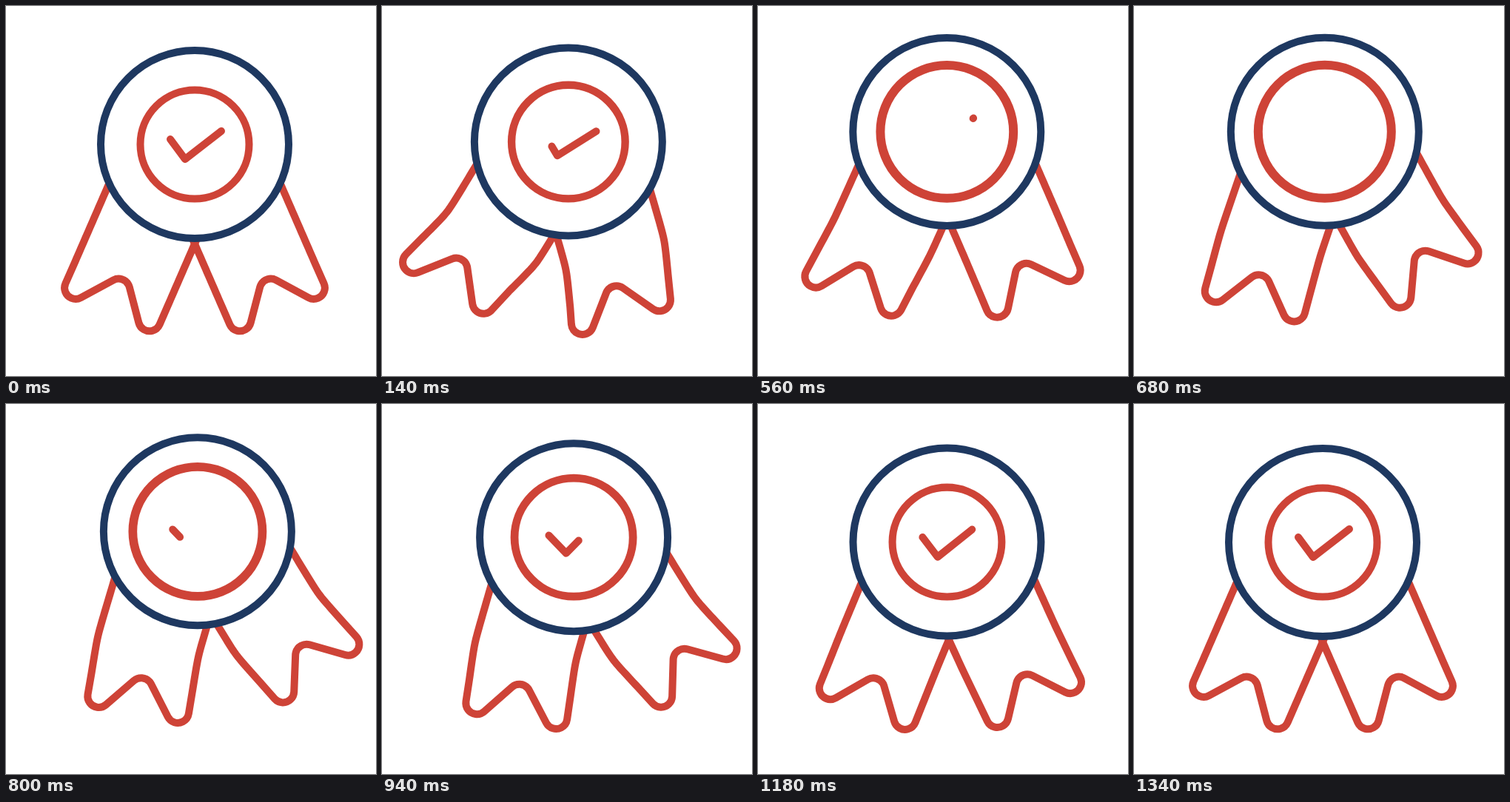
Write an HTML page with a canvas that moves like this. It is 500x500 px and loops after 1500 ms.

```html
<!DOCTYPE html>
<html lang="en">
<head>
<meta charset="utf-8">
<title>Award ribbon</title>
<style>
  html, body { margin: 0; width: 100%; height: 100%; overflow: hidden; background: #fff; }
  canvas { display: block; width: 500px; height: 500px; }
</style>
</head>
<body>
<canvas id="stage" width="500" height="500"></canvas>
<script>
const ctx = document.getElementById('stage').getContext('2d');
const RED = '#ce4337', NAVY = '#1e3860', LOOP = 1500, STEP = 20;
const rad = deg => deg * Math.PI / 180;

// Extreme poses; each ribbon gives its outward sway at top, middle and tip
const SWUNG_LEFT = { tilt: 8.6, left: [9, 10.5, 37.8], right: [2.5, 1.5, -19] };
const SWUNG_RIGHT = { tilt: -13, left: [14, 21, 17.5], right: [3, -3, 6] };

// cubic-bezier(1/3, 0, 1/3, 1)
function ease(x) {
  if (x <= 0) return 0;
  if (x >= 1) return 1;
  let lo = 0, hi = 1;
  for (let i = 0; i < 30; i++) {
    const m = (lo + hi) / 2;
    if (m - m * m + m * m * m < x) lo = m; else hi = m;
  }
  return 3 * lo * lo - 2 * lo * lo * lo;
}
const span = (t, from, to) => ease((t - from) / (to - from));

function pen(color, width) {
  ctx.strokeStyle = color;
  ctx.lineWidth = width;
  ctx.lineCap = ctx.lineJoin = 'round';
}

function ring(r, color, width) {
  ctx.beginPath();
  ctx.arc(0, 0, r, 0, 2 * Math.PI);
  pen(color, width);
  ctx.stroke();
}

// Ribbon in its own axes: x points outward, y runs down its length
function ribbon(side, [top, mid, tip]) {
  const upper = (mid - top) / 70, lower = (tip - mid) / 77, R = 15;
  const bend = y => {
    const d = y - 165;
    return top + upper * (y - 95) + (lower - upper) * (d + Math.hypot(d, 12)) / 2;
  };
  const tilt = Math.atan(lower), drop = tip * 0.12, cut = rad(38.2);
  ctx.save();
  ctx.scale(side, 1);
  ctx.rotate(rad(-23.5));
  ctx.beginPath();
  for (let y = 60; y <= 215; y += 5) ctx.lineTo(85 + bend(y), y);
  ctx.arc(70.2 + tip, 242 + drop, R, -tilt, Math.PI - cut);
  ctx.arc(15.8 + tip, 221.3 + drop, R, -cut, Math.PI + cut, true);
  ctx.arc(-38.6 + tip, 242 + drop, R, cut, Math.PI - tilt);
  for (let y = 215; y >= 100; y -= 5) ctx.lineTo(-53.6 + bend(y), y);
  pen(RED, 10);
  ctx.stroke();
  ctx.restore();
}

function check(from, to) {
  if (to - from < 0.002) return;
  const len = Math.hypot(20, 27) + Math.hypot(49, 38);
  ctx.beginPath();
  ctx.moveTo(-33, -7);
  ctx.lineTo(-13, 20);
  ctx.lineTo(36, -18);
  pen(RED, 10);
  ctx.setLineDash([(to - from) * len, 2 * len]);
  ctx.lineDashOffset = -from * len;
  ctx.stroke();
  ctx.setLineDash([]);
}

function draw(t) {
  const rise = span(t, 0, 615), fall = span(t, 680, 1285), up = rise - fall;
  const cross = span(t, 340, 900);
  const toLeft = span(t, 0, 260) - cross;
  const toRight = cross - span(t, 930, 1310);
  const mix = (a, b) => a * toLeft + b * toRight;
  const sway = key => SWUNG_LEFT[key].map((v, i) => mix(v, SWUNG_RIGHT[key][i]));

  ctx.fillStyle = '#fff';
  ctx.fillRect(0, 0, 500, 500);
  ctx.save();
  ctx.translate(255 + mix(-4.1, 4.1), 187 - 17.2 * up);

  ctx.save();
  ctx.rotate(rad(mix(SWUNG_LEFT.tilt, SWUNG_RIGHT.tilt)));
  ribbon(-1, sway('left'));
  ribbon(1, sway('right'));
  ctx.restore();

  ctx.beginPath();
  ctx.arc(0, 0, 127, 0, 2 * Math.PI);
  ctx.fill();
  ring(127, NAVY, 10);
  ring(73.5 + 16.5 * up, RED, 10 + 2 * up);

  ctx.rotate(rad(mix(7.5, -7.5)));
  if (rise < 1) check(rise, 1); else check(0, fall);
  ctx.restore();
}

function tick() {
  const t = performance.now() % LOOP;
  draw(Math.floor(t / STEP) * STEP);
  requestAnimationFrame(tick);
}
tick();
</script>
</body>
</html>
```
